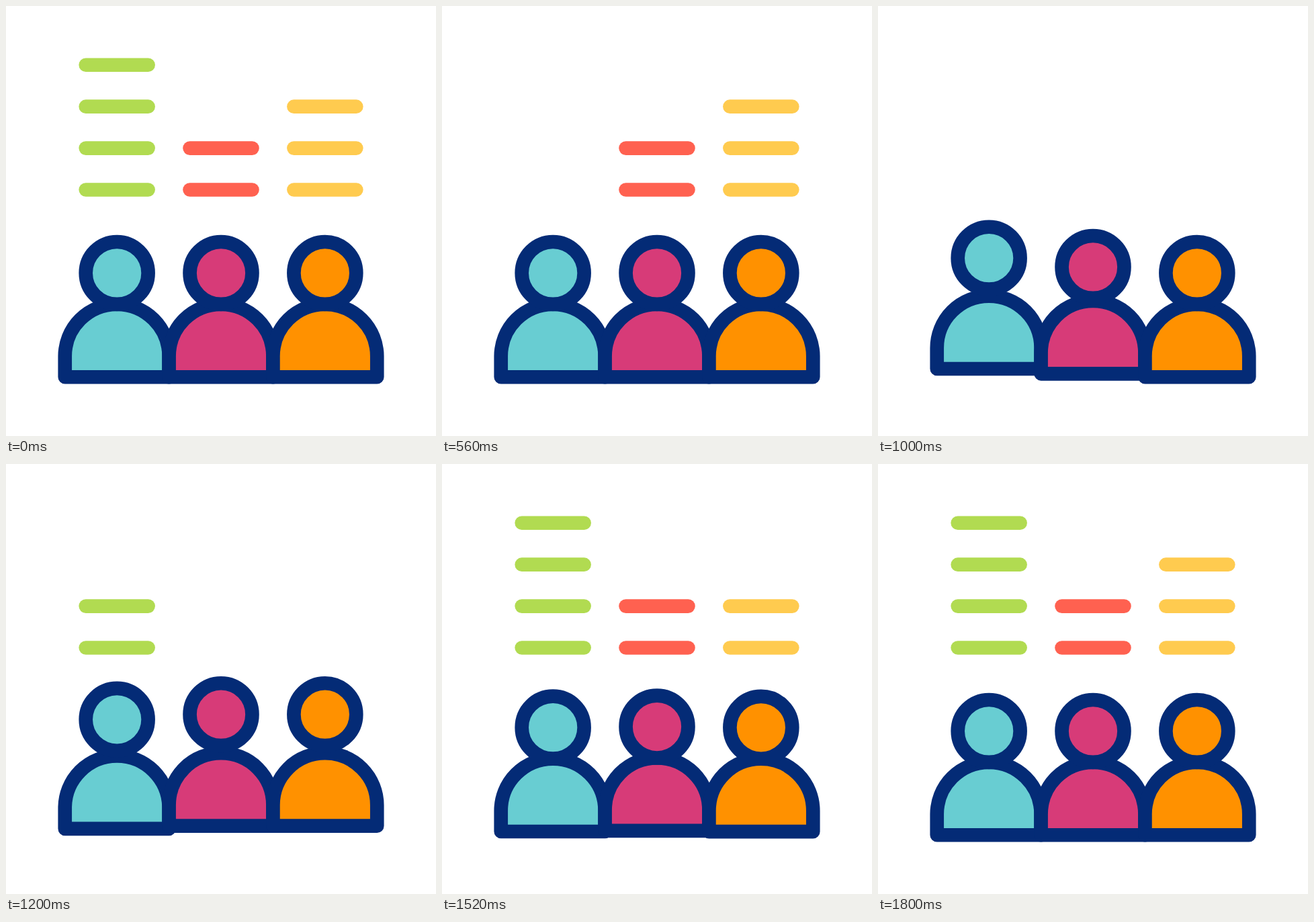
Write an HTML page that moves like this. It is 640 px wide and 640 px high and loops after 2.16 s.

```html
<!DOCTYPE html>
<html lang="en">
<head>
<meta charset="utf-8">
<title>Group vote</title>
<style>
  html, body { margin: 0; width: 100%; height: 100%; overflow: hidden; background: #fff; }
  svg { display: block; width: 100%; height: 100%; }
</style>
</head>
<body>
<svg id="stage" viewBox="0 0 62 62" stroke-width="2" stroke-linecap="round" stroke-linejoin="round"></svg>
<script>
const LOOP = 2160, STEP = 40, NAVY = '#042b76';
const columns = [
  { x: 16, skin: '#68cdd2', bar: '#b1db51', count: 4 },
  { x: 31, skin: '#d73b78', bar: '#ff6150', count: 2 },
  { x: 46, skin: '#ff9100', bar: '#ffcb4f', count: 3 }
];
const stage = document.getElementById('stage');

function add(tag, attrs) {
  const el = document.createElementNS('http://www.w3.org/2000/svg', tag);
  for (const name in attrs) el.setAttribute(name, attrs[name]);
  return stage.appendChild(el);
}

// Columns empty from the top down and fill again from the bottom up.
const hideTimes = [320, 400, 480, 560, 680, 720, 800, 840, 920];
const bars = [];
const people = columns.map(({ x, skin, bar, count }, i) => {
  const first = bars.length;
  for (let row = 0; row < count; row++) {
    bars.push({
      el: add('path', { d: `M${x - 4.5} ${26.5 - 6 * row}h9`, stroke: bar }),
      hide: hideTimes[first + count - 1 - row],
      show: 1120 + 54 * (first + row)
    });
  }
  const paint = { fill: skin, stroke: NAVY };
  return {
    delay: 80 * i,
    body: add('path', { d: `M${x - 7.5} 53.5v-3a7.5 7.5 0 0 1 15 0v3z`, ...paint }),
    head: add('circle', { cx: x, cy: 38.5, r: 4.5, ...paint })
  };
});

// Height of a hop, 0 to 1, around its peak time.
const hop = (t, peak, half) => Math.max(0, 1 - (Math.abs(t - peak) / half) ** 2.4);
const lift = (el, height) => el.setAttribute('transform', `translate(0 ${-height})`);

function draw(now) {
  const t = Math.floor((now % LOOP) / STEP) * STEP;
  for (const { el, hide, show } of bars) {
    el.setAttribute('visibility', t >= hide && t < show ? 'hidden' : 'visible');
  }
  for (const { delay, body, head } of people) {
    const jump = hop(t - delay, 1080, 192);
    const bounce = 0.62 * hop(t - delay, 1442, 161);
    lift(body, 1.35 * jump + bounce);
    lift(head, 2.45 * jump + bounce);
  }
}

const start = performance.now();
function tick() {
  draw(performance.now() - start);
  requestAnimationFrame(tick);
}
tick();
</script>
</body>
</html>
```
